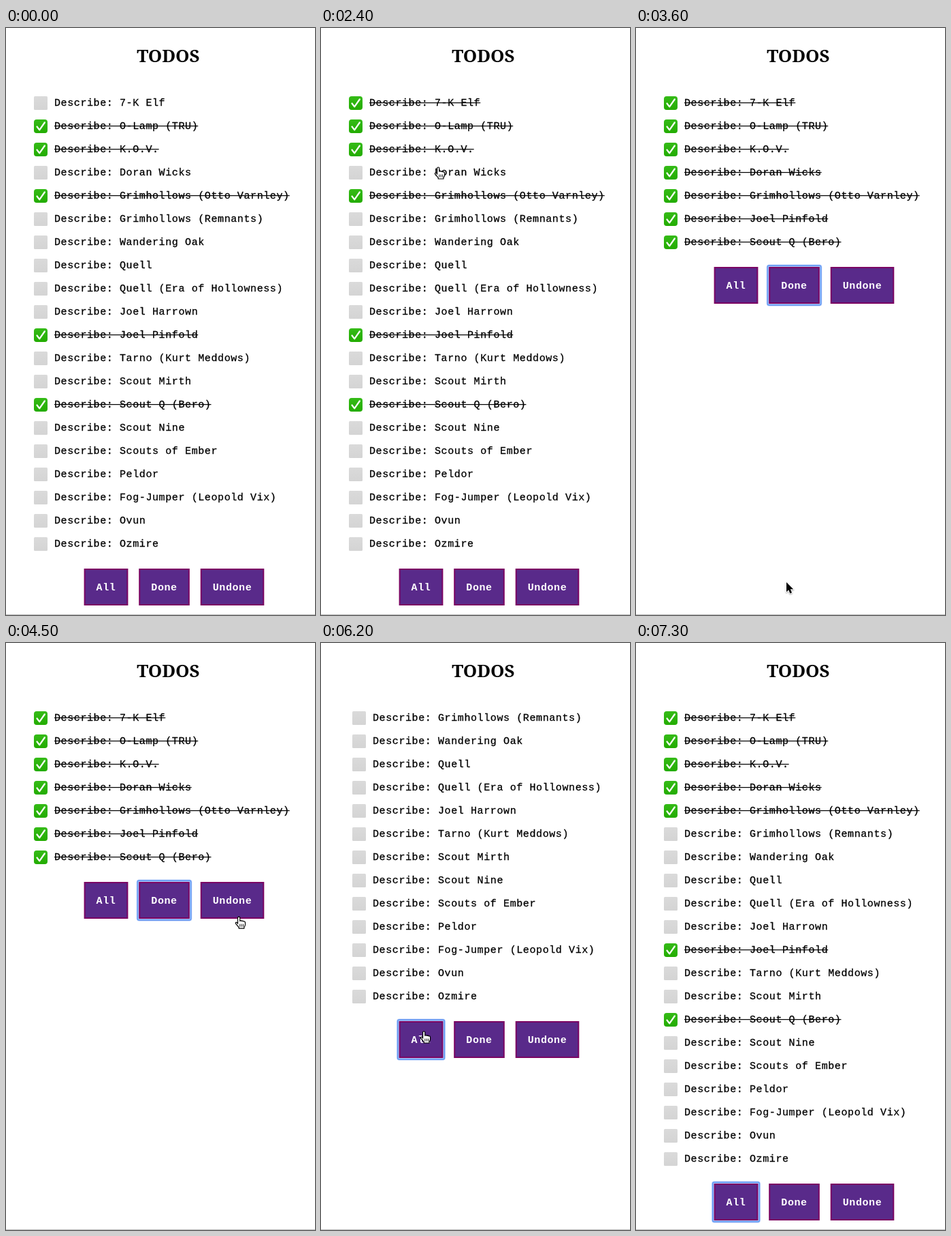
Write an HTML page with a canvas that moves like this. It is 454 px wide and 860 px high and loops after 7400 ms.

```html
<!DOCTYPE html>
<html lang="en">
<head>
<meta charset="utf-8">
<title>Todos</title>
<style>
html, body { margin: 0; width: 100%; height: 100%; overflow: hidden; background: #fff; }
canvas { display: block; width: 454px; height: 860px; }
</style>
</head>
<body>
<canvas id="stage"></canvas>
<script>
const W = 454, H = 860, LOOP = 7400, STEP = 100;
const ROW = 34, TOP = 92;
const MONO = '"Liberation Mono", "Courier New", monospace';
const SLAB = '"Noto Serif", serif';

const canvas = document.getElementById('stage');
const ctx = canvas.getContext('2d');
const ratio = window.devicePixelRatio || 1;
canvas.width = W * ratio;
canvas.height = H * ratio;
ctx.scale(ratio, ratio);

const names = [
  '7-K Elf', 'O-Lamp (TRU)', 'K.O.V.', 'Doran Wicks',
  'Grimhollows (Otto Varnley)', 'Grimhollows (Remnants)', 'Wandering Oak',
  'Quell', 'Quell (Era of Hollowness)', 'Joel Harrown', 'Joel Pinfold',
  'Tarno (Kurt Meddows)', 'Scout Mirth', 'Scout Q (Bero)', 'Scout Nine',
  'Scouts of Ember', 'Peldor', 'Fog-Jumper (Leopold Vix)', 'Ovun', 'Ozmire'
];
// When each finished item gets ticked (ms)
const tickedAt = { 0: 1500, 1: 0, 2: 0, 3: 2500, 4: 0, 10: 0, 13: 0 };

const buttons = [
  { label: 'All', x: 114.6, w: 64.8 },
  { label: 'Done', x: 195.2, w: 74.6 },
  { label: 'Undone', x: 285.7, w: 93.6 }
];

// [time, value] pairs; the last one reached applies
const filters = [[0, 'All'], [3300, 'Done'], [4700, 'Undone'], [6500, 'All']];
const focuses = [[0, ''], [500, 'All'], [1500, ''], [3200, 'Done'], [4700, 'Undone'], [6000, 'All']];

// Pointer path: time, x, y
const path = [
  [100, 300, 33], [500, 150, 822], [700, 150, 822], [1300, 191, 115],
  [1600, 191, 115], [2200, 172, 204], [2600, 172, 204], [3100, 221, 812],
  [3900, 221, 812], [4600, 349, 377], [4900, 349, 377], [5400, 281, 575],
  [5700, 151, 569], [6700, 151, 569], [7000, 166, 640]
];

const ease = p => p * p * (3 - 2 * p);

function current(list, t) {
  return list.filter(entry => entry[0] <= t).pop()[1];
}

function pointerAt(t) {
  for (let i = 1; i < path.length; i++) {
    const [t0, x0, y0] = path[i - 1], [t1, x1, y1] = path[i];
    if (t >= t0 && t < t1) {
      const p = ease((t - t0) / (t1 - t0));
      return { x: x0 + (x1 - x0) * p, y: y0 + (y1 - y0) * p };
    }
  }
  return null;
}

function fillRound(x, y, w, h, r, color) {
  ctx.fillStyle = color;
  ctx.beginPath();
  ctx.roundRect(x, y, w, h, r);
  ctx.fill();
}

function text(str, x, y, font, color, align = 'left', spacing = 0) {
  ctx.font = font;
  ctx.letterSpacing = spacing + 'px';
  ctx.textAlign = align;
  ctx.fillStyle = color;
  ctx.fillText(str, x, y);
}

function drawBox(x, y, done) {
  const shade = ctx.createLinearGradient(0, y, 0, y + 20);
  shade.addColorStop(0, done ? '#35bb18' : '#dadada');
  shade.addColorStop(1, done ? '#23ac00' : '#d4d4d4');
  fillRound(x, y, 20, 20, done ? 4 : 1.5, shade);
  if (!done) return;
  ctx.strokeStyle = '#fff';
  ctx.lineWidth = 2.2;
  ctx.lineCap = ctx.lineJoin = 'round';
  ctx.beginPath();
  ctx.moveTo(x + 4.5, y + 10.5);
  ctx.lineTo(x + 8.2, y + 15.3);
  ctx.lineTo(x + 15.8, y + 4.5);
  ctx.stroke();
}

function drawRow(name, i, x, done) {
  const y = TOP + i * ROW, label = 'Describe: ' + name;
  drawBox(x, y + 8, done);
  text(label, x + 30, y + 22, '15px ' + MONO, '#000', 'left', .6);
  ctx.strokeStyle = '#000';
  ctx.lineWidth = .3;
  ctx.strokeText(label, x + 30, y + 22);
  if (done) ctx.fillRect(x + 30, y + 17, ctx.measureText(label).width, 1.2);
}

function drawButton(b, y, focused) {
  if (focused) {
    fillRound(b.x - 3.5, y - 3.5, b.w + 7, 61, 4, 'rgba(90,145,245,.45)');
    fillRound(b.x - 2.7, y - 2.7, b.w + 5.4, 59.4, 3, '#6498f2');
    fillRound(b.x - 1, y - 1, b.w + 2, 56, 0, '#b4cdf9');
  }
  fillRound(b.x, y, b.w, 54, 0, '#7b0563');
  fillRound(b.x + 2, y + 2, b.w - 4, 50, 0, '#592a8a');
  text(b.label, b.x + b.w / 2, y + 32, 'bold 15px ' + MONO, '#fff', 'center', .6);
}

const arrow = new Path2D('M0 0V14.2L3.2 11.2L5.4 16.4L8 15.3L5.8 10.3H10.2Z');
const hand = new Path2D(
  'M-1.4 10.2L-1.4 1.6Q-1.4 0 .2 0T1.8 1.6V6.2Q3.3 5 4.6 6.4Q6 5.4 7.2 6.9' +
  'Q9.6 6.3 9.6 8.8V11.4Q9.4 13.6 8 15V17H.2V15.4L-4.4 10Q-5 8.4-3.6 8Q-2.4 8-1.4 10.2Z');
const knuckles = new Path2D('M1.8 11V14.2M4.2 11V14.2M6.6 11V14.2');

function drawPointer(p, isHand) {
  ctx.save();
  ctx.translate(p.x, p.y);
  ctx.lineJoin = ctx.lineCap = 'round';
  if (isHand) {
    ctx.fillStyle = '#fff';
    ctx.strokeStyle = '#000';
    ctx.lineWidth = 1.2;
    ctx.fill(hand);
    ctx.stroke(hand);
    ctx.lineWidth = .9;
    ctx.stroke(knuckles);
  } else {
    ctx.shadowColor = 'rgba(0,0,0,.35)';
    ctx.shadowBlur = 2;
    ctx.shadowOffsetY = 1;
    ctx.strokeStyle = '#fff';
    ctx.lineWidth = 2;
    ctx.stroke(arrow);
    ctx.shadowColor = 'transparent';
    ctx.fillStyle = '#000';
    ctx.fill(arrow);
  }
  ctx.restore();
}

function draw(t) {
  ctx.fillStyle = '#fff';
  ctx.fillRect(0, 0, W, H);
  text('TODOS', 238.5, 50, 'bold 26px ' + SLAB, '#000', 'center');

  const filter = current(filters, t), focus = current(focuses, t);
  const rows = names
    .map((name, i) => ({ name, done: tickedAt[i] <= t }))
    .filter(r => filter === 'All' || r.done === (filter === 'Done'));
  const left = filter === 'Undone' ? 46 : 41;
  rows.forEach((r, i) => drawRow(r.name, i, left, r.done));

  const end = TOP + rows.length * ROW, by = end + 20;
  buttons.forEach(b => drawButton(b, by, b.label === focus));

  ctx.fillStyle = '#bdbdbd';
  ctx.fillRect(0, 859, W, 1);

  const p = pointerAt(t);
  if (!p) return;
  const onRow = p.y > TOP && p.y < end && p.x > 40 && p.x < 417;
  const onButton = p.y > by && p.y < by + 54 &&
    buttons.some(b => p.x > b.x && p.x < b.x + b.w);
  drawPointer(p, onRow || onButton);
}

const start = performance.now();
function tick() {
  const t = (performance.now() - start) % LOOP;
  draw(Math.floor(t / STEP) * STEP);
  requestAnimationFrame(tick);
}
tick();
</script>
</body>
</html>
```
